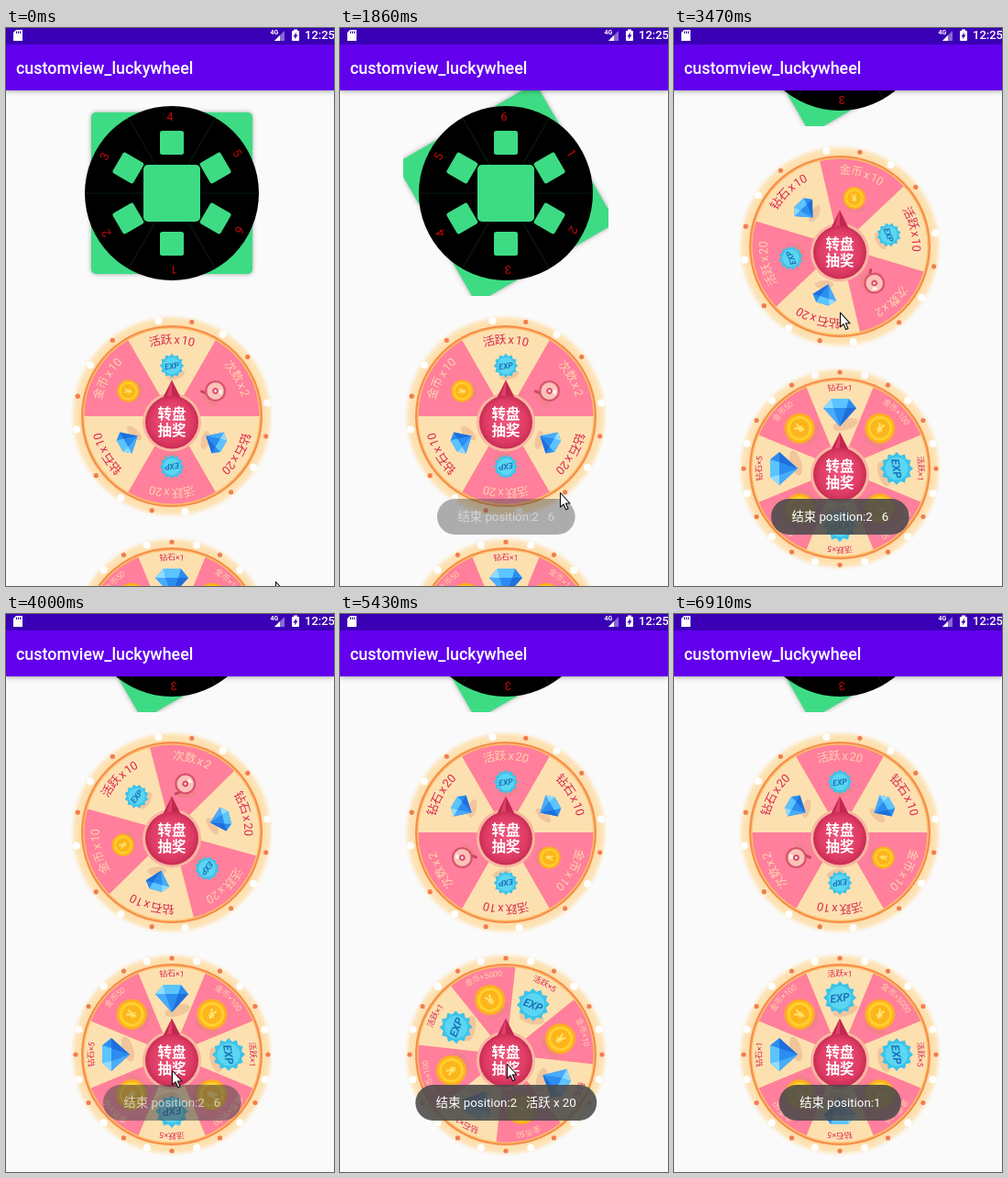
Recreate the animation shown at these times as an HTML page with a canvas. Size 358 by 608 pixels, loop 7220 ms.

```html
<!DOCTYPE html>
<html lang="zh">
<head>
<meta charset="utf-8">
<style>
html, body { margin: 0; width: 100%; height: 100%; overflow: hidden; background: #fafafa; }
canvas { display: block; }
</style>
</head>
<body>
<canvas id="stage" width="358" height="608"></canvas>
<script>
const c = document.getElementById('stage').getContext('2d');
const LOOP = 7220, W = 358, H = 608, TAU = Math.PI * 2;
const FONT = 'Roboto, "Noto Sans CJK SC", "Noto Sans CJK", sans-serif';
const CREAM = '#fde0b0', PINK = '#ff7f9c', CRIMSON = '#d8284f', PEACH = '#ffd3ac', GREEN = '#3ddc84';

const rad = deg => deg * Math.PI / 180;
const clamp = x => Math.max(0, Math.min(1, x));
const ramp = (t, from, to) => clamp((t - from) / (to - from));
const ease = x => (1 - Math.cos(Math.PI * x)) / 2;

// Cursor path: time, x, y
const PATH = [
  [40, 294, 603], [740, 194, 180], [1180, 194, 180], [1500, 238, 468], [1860, 240, 506],
  [2240, 246, 570], [2320, 246, 560], [2570, 248, 150], [2640, 248, 150], [3040, 181, 258],
  [3280, 181, 258], [3900, 181, 497], [4000, 181, 497], [4720, 182, 490], [5450, 182, 490],
  [5740, 291, 596], [6100, 291, 598], [6400, 293, 612]
];
const PRESSES = [[740, 800], [2300, 2640], [3040, 3105], [4760, 4865]];
const TOASTS = [
  ['结束 position:2   6', 1790, 1930, 3910, 4160],
  ['结束 position:2   活跃 x 20', 4730, 4870, 6520, 6680],
  ['结束 position:1', 6700, 6890, 8000, 8200]
];

function cursorAt(t) {
  let i = PATH.findIndex(p => p[0] > t);
  if (i < 0) i = PATH.length;
  const a = PATH[Math.max(0, i - 1)], b = PATH[Math.min(i, PATH.length - 1)];
  const k = a === b ? 0 : ease(ramp(t, a[0], b[0]));
  return [a[1] + (b[1] - a[1]) * k, a[2] + (b[2] - a[2]) * k];
}

function at(x, y, deg, scale, draw) {
  c.save();
  c.translate(x, y);
  c.rotate(rad(deg));
  c.scale(scale, scale);
  draw();
  c.restore();
}

function disc(x, y, r, fill) {
  c.beginPath();
  c.arc(x, y, r, 0, TAU);
  c.fillStyle = fill;
  c.fill();
}

function poly(fill, ...pts) {
  c.beginPath();
  for (let i = 0; i < pts.length; i += 2) c.lineTo(pts[i], pts[i + 1]);
  c.closePath();
  c.fillStyle = fill;
  c.fill();
}

function box(x, y, w, h, r, fill) {
  c.beginPath();
  c.roundRect(x, y, w, h, r);
  c.fillStyle = fill;
  c.fill();
}

function label(text, x, y, size, fill, weight = 400, align = 'center') {
  c.font = `${weight} ${size}px ${FONT}`;
  c.textAlign = align;
  c.textBaseline = 'middle';
  c.fillStyle = fill;
  c.fillText(text, x, y);
}

function arcLabel(text, r, size, fill) {
  c.font = `400 ${size}px ${FONT}`;
  const widths = [...text].map(ch => ch === ' ' ? size * 0.14 : c.measureText(ch).width);
  let pos = -widths.reduce((a, b) => a + b) / 2;
  [...text].forEach((ch, i) => {
    const angle = (pos + widths[i] / 2) / r;
    at(0, 0, angle * 180 / Math.PI, 1, () => label(ch, 0, -r, size, fill));
    pos += widths[i];
  });
}

function shadow() {
  c.beginPath();
  c.ellipse(6, 14, 14, 6, -0.3, 0, TAU);
  c.fillStyle = 'rgba(214,140,110,.3)';
  c.fill();
}

const icons = {
  diamond() {
    shadow();
    poly('#2b8df0', -9, -14, 10, -14, 18, -4, 0, 16, -18, -4);
    poly('#5cc4ff', -9, -14, 10, -14, 7, -4, -7, -4);
    poly('#1e6fdc', 7, -4, 18, -4, 0, 16);
    poly('#49acfa', -18, -4, -7, -4, 0, 16);
    poly('#8fdcff', -9, -14, -7, -4, -18, -4);
  },
  exp() {
    shadow();
    const pts = [];
    for (let i = 0; i < 24; i++) {
      const r = i % 2 ? 14.5 : 18, a = i * TAU / 24;
      pts.push(r * Math.sin(a), -r * Math.cos(a));
    }
    poly('#3cc3ea', ...pts);
    disc(0, 0, 12.5, '#5ad6f2');
    at(0, 0, -8, 1, () => label('EXP', 0, 1, 12, '#1c74b8', 'italic 700'));
  },
  coin() {
    shadow();
    disc(0, 0, 16.5, '#ffb01e');
    disc(0, 0, 13.5, '#ffd02f');
    disc(0, 0, 10.5, '#fdb51c');
    at(0, 0, -20, 1, () => label('¥', 0, 1, 15, '#ffe570', 700));
  },
  gauge() {
    shadow();
    c.lineWidth = 4;
    c.strokeStyle = '#c9485f';
    c.beginPath();
    c.moveTo(-3, 13);
    c.lineTo(-11, 19);
    c.stroke();
    disc(0, 0, 15.5, '#d9536c');
    disc(0, 0, 12.5, '#fbc3b9');
    poly('#fff3e6', 0, 0, 3, -10, 10, -5);
    disc(0, 0, 4.5, '#dc4a67');
    disc(0, 0, 1.8, '#fff');
  }
};

const SIX = [['活跃 x 10', 'exp'], ['次数 x 2', 'gauge'], ['钻石 x 20', 'diamond'],
  ['活跃 x 20', 'exp'], ['钻石 x 10', 'diamond'], ['金币 x 10', 'coin']];
const EIGHT = [['钻石×1', 'diamond'], ['金币×100', 'coin'], ['活跃×1', 'exp'], ['金币×5000', 'coin'],
  ['活跃×5', 'exp'], ['金币×10', 'coin'], ['钻石×5', 'diamond'], ['金币50', 'coin']];
const SIX_LOOK = { textR: 83, size: 12.8, iconR: 55, scale: 0.74, bulbs: [-8, 12, 32, 52].flatMap(a => [a, a + 90, a + 180, a + 270]), step: 20, first: -8 };
const EIGHT_LOOK = { textR: 88, size: 8.8, iconR: 62, scale: 1, bulbs: Array.from({ length: 24 }, (_, i) => i * 15), step: 15, first: 15 };

function numberWheel(y, deg) {
  c.save();
  c.beginPath();
  c.rect(69, y - 112, 224, 224);
  c.clip();
  at(181, y, deg, 1, () => {
    c.shadowColor = 'rgba(0,0,0,.35)';
    c.shadowBlur = 5;
    box(-88, -88, 176, 176, 5, GREEN);
  });
  disc(181, y, 95, '#000');
  [4, 5, 6, 1, 2, 3].forEach((n, i) => at(181, y, deg + i * 60, 1, () => {
    label(n, -2, -83, 13, '#c40a0a');
    box(-13, -68, 26, 26, 2.5, GREEN);
    at(0, 0, 30, 1, () => {
      c.fillStyle = '#0c1f15';
      c.fillRect(-0.5, -95, 1, 95);
    });
  }));
  box(150, y - 31, 62, 62, 5, GREEN);
  c.restore();
}

function pointer(y) {
  disc(181, y, 32, '#f8b7a0');
  poly('#c3264f', 170, y - 24, 181, y - 46, 192, y - 24);
  poly('#dc4267', 174, y - 24, 181, y - 46, 181, y - 24);
  const g = c.createRadialGradient(181, y - 4, 4, 181, y, 29);
  g.addColorStop(0, '#ee5279');
  g.addColorStop(0.75, '#dd3b64');
  g.addColorStop(1, '#c92c55');
  disc(181, y, 29, g);
  label('转盘', 181, y - 8.5, 15.5, '#fff', 900);
  label('抽奖', 181, y + 9.5, 15.5, '#fff', 900);
}

function prizeWheel(y, deg, items, look) {
  const glow = c.createRadialGradient(181, y, 100, 181, y, 111);
  glow.addColorStop(0, '#fddfab');
  glow.addColorStop(0.5, '#fde4b9');
  glow.addColorStop(1, 'rgba(253,232,198,0)');
  disc(181, y, 111, glow);
  disc(181, y, 99, '#f68d4c');
  disc(181, y, 96.8, '#fcc36c');

  const half = 180 / items.length;
  items.forEach(([text, icon], i) => at(181, y, deg + i * half * 2, 1, () => {
    c.beginPath();
    c.moveTo(0, 0);
    c.arc(0, 0, 95.5, rad(-90 - half), rad(-90 + half));
    c.closePath();
    c.fillStyle = i % 2 ? PINK : CREAM;
    c.fill();
    arcLabel(text, look.textR, look.size, i % 2 ? PEACH : CRIMSON);
    at(0, -look.iconR, 0, look.scale, icons[icon]);
  }));

  for (const a of look.bulbs) {
    const white = Math.round((a - look.first) / look.step) % 2 === 0;
    const fixed = look === SIX_LOOK ? ((a + 8) % 90) % 40 === 0 : white;
    disc(181 + 105 * Math.sin(rad(a)), y - 105 * Math.cos(rad(a)), fixed ? 4 : 2.6, fixed ? '#fff' : '#f27d4e');
  }
  pointer(y + 6.5);
}

function overscroll(h) {
  if (h <= 0) return;
  c.beginPath();
  c.moveTo(0, H);
  c.lineTo(0, H - 29 * h);
  c.quadraticCurveTo(177, H - 87 * h, W, H - 29 * h);
  c.lineTo(W, H);
  c.fillStyle = `rgba(98,0,238,${0.28 * Math.min(1, h * 1.5)})`;
  c.fill();
}

function bars() {
  c.save();
  c.shadowColor = 'rgba(0,0,0,.35)';
  c.shadowBlur = 5;
  c.shadowOffsetY = 1;
  c.fillStyle = '#6200ee';
  c.fillRect(0, 0, W, 68);
  c.restore();
  c.fillStyle = '#3a00b5';
  c.fillRect(0, 0, W, 18);
  label('customview_luckywheel', 11, 44.5, 17.9, '#fff', 500, 'left');
  // Memory card
  poly('#fff', 11, 2, 18, 2, 18, 14, 8, 14, 8, 5);
  c.fillStyle = '#3a00b5';
  for (const x of [11, 13, 15]) c.fillRect(x, 3.5, 1, 2.5);
  // Signal and battery
  label('4G', 293, 5, 7, '#fff', 700);
  poly('#8a68d2', 304, 3, 304, 14, 293, 14);
  poly('#fff', 299, 8, 299, 14, 293, 14);
  box(312, 3, 8, 11, 1, '#fff');
  c.fillStyle = '#fff';
  c.fillRect(314, 1.5, 4, 2);
  poly('#3a00b5', 317, 4.5, 313.5, 9.5, 315.5, 9.5, 315, 12.5, 318.5, 7.5, 316.5, 7.5);
  label('12:25', 326, 8.5, 13, '#fff', 500, 'left');
}

function toast([text, in0, in1, out0, out1], t) {
  const alpha = ramp(t, in0, in1) * (1 - ramp(t, out0, out1));
  if (!alpha) return;
  c.save();
  c.globalAlpha = alpha;
  c.font = `400 13.3px ${FONT}`;
  const w = c.measureText(text).width + 45;
  box(181.3 - w / 2, 513, w, 39, 19.5, 'rgba(74,74,74,.88)');
  label(text, 181.3, 533, 13.3, '#fff');
  c.restore();
}

function cursor(t) {
  const [x, y] = cursorAt(t);
  if (y > H) return;
  if (PRESSES.some(([a, b]) => t >= a && t < b)) disc(x, y + 1, 15.5, 'rgba(242,236,50,.8)');
  c.lineWidth = 2;
  c.strokeStyle = '#111';
  c.lineJoin = 'round';
  at(x, y, 0, 1, () => {
    poly('#fff', 0.5, 0.5, 0.5, 16, 4, 12.8, 6.6, 18.8, 9, 17.8, 6.4, 12, 11, 12);
    c.lineWidth = 1.1;
    c.stroke();
  });
}

function frame() {
  const t = performance.now() % LOOP;
  const drag = t < 2320 ? 0 : t < 2570 ? 560 - cursorAt(t)[1] : 410;
  const scroll = Math.max(0, Math.min(185, drag));
  const pull = clamp((drag - 185) / 225) * (1 - ease(ramp(t, 2640, 3010)));

  c.fillStyle = '#fafafa';
  c.fillRect(0, 0, W, H);
  numberWheel(180 - scroll, 960 * ease(ramp(t, 805, 1773)));
  prizeWheel(423 - scroll, 1260 * ease(ramp(t, 3240, 4695)), SIX, SIX_LOOK);
  prizeWheel(665 - scroll, 990 * ease(ramp(t, 5000, 6419)), EIGHT, EIGHT_LOOK);
  overscroll(pull);
  bars();
  TOASTS.forEach(item => toast(item, t));
  cursor(t);
  requestAnimationFrame(frame);
}
requestAnimationFrame(frame);
</script>
</body>
</html>
```
